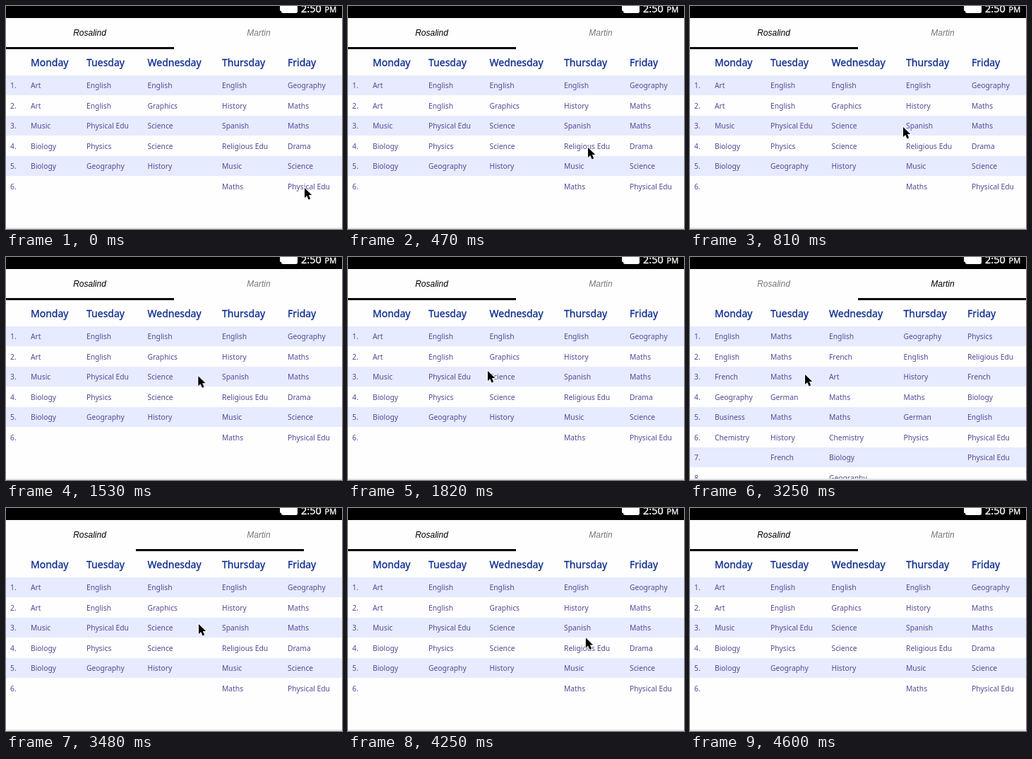
An HTML page that plays this animation: 476 by 315 pixels, repeating every 5450 ms.

```html
<!DOCTYPE html>
<html lang="en">
<head>
<meta charset="utf-8">
<title>Timetable</title>
<style>
html, body { margin: 0; width: 100%; height: 100%; overflow: hidden; background: #fefefe; }
svg { display: block; width: 476px; height: 315px; }
text { font-family: "Noto Sans", "Open Sans", sans-serif; white-space: pre; }
.cell { font-size: 10.3px; fill: #544a94; }
.head { font-size: 14px; fill: #0a2a8c; stroke: #0a2a8c; stroke-width: .3px; }
.tab { font: italic 12px "Liberation Sans", Arial, sans-serif; text-anchor: middle; }
.clock { fill: #fff; stroke: #fff; stroke-width: .3px; }

.first, .second, .tab, #bar, #arrow, #beam { animation: 5450ms step-end infinite; }
.first { animation-name: first; }
.second { animation-name: second; }
#tab1 { animation-name: tab1; }
#tab2 { animation-name: tab2; }
#bar { animation-name: bar; }
#arrow { animation-name: arrow; }
#beam { animation-name: beam; }

@keyframes first {
  0%, 62.789%, 100% { visibility: visible; }
  34.495% { visibility: hidden; }
}
@keyframes second {
  0%, 62.789%, 100% { visibility: hidden; }
  34.495% { visibility: visible; }
}
@keyframes tab1 {
  0%, 62.789%, 100% { fill: #000; }
  34.495% { fill: #777; }
}
@keyframes tab2 {
  0%, 62.789%, 100% { fill: #777; }
  34.495% { fill: #000; }
}
@keyframes beam {
  0%, 59.633%, 100% { visibility: hidden; }
  38.716% { visibility: visible; }
}
@keyframes bar {
  0%, 66.972%, 100% { transform: translateX(0); }
  34.495%, 62.789% { transform: translateX(229px); }
  34.495% { transform: translateX(9px); }
  35.541% { transform: translateX(55px); }
  36.606% { transform: translateX(143px); }
  37.651% { transform: translateX(218px); }
  38.716% { transform: translateX(238px); }
  63.853% { transform: translateX(184px); }
  64.899% { transform: translateX(95px); }
  65.963% { transform: translateX(20px); }
}
@keyframes arrow {
  0% { transform: translate(423px, 257px); }
  4.404% { transform: translate(423px, 257px); animation-timing-function: steps(5, start); }
  9.633% { transform: translate(340px, 200px); animation-timing-function: steps(6, start); }
  15.908% { transform: translate(302px, 171px); }
  26.972% { transform: translate(302px, 171px); animation-timing-function: steps(7, start); }
  34.465% { transform: translate(198px, 161px); animation-timing-function: steps(4, start); }
  38.71% { transform: translate(146px, 165px); }
  38.716% { transform: translate(-40px, 165px); }
  59.633% { transform: translate(135.5px, 166.5px); animation-timing-function: steps(5, start); }
  64.908% { transform: translate(273px, 164px); animation-timing-function: steps(3, start); }
  68.055% { transform: translate(318px, 161px); }
  77.982% { transform: translate(318px, 161px); animation-timing-function: steps(7, start); }
  85.468%, 100% { transform: translate(450px, 318px); }
}
</style>
</head>
<body>
<svg viewBox="0 0 476 315">
  <rect width="476" height="17"/>
  <rect x="390" y="-6" width="23" height="16" rx="2.5" fill="#fff"/>
  <rect x="388" y="-2" width="4" height="9" rx="1" fill="#fff"/>
  <text class="clock" x="418" y="9" font-size="14.5">2:50</text>
  <text class="clock" x="451.5" y="9" font-size="11">PM</text>

  <text class="tab" id="tab1" x="118.5" y="42">Rosalind</text>
  <text class="tab" id="tab2" x="358" y="42">Martin</text>
  <rect id="bar" y="58" width="238" height="3"/>

  <g id="tables"></g>
  <rect y="313" width="476" height="2" fill="#e4e4e4"/>

  <g id="beam" fill="none">
    <path id="ibeam" d="M137.5 159.5Q141 159.5 141 162V172Q141 174.5 137.5 174.5M144.5 159.5Q141 159.5 141 162M141 172Q141 174.5 144.5 174.5M139 168.5H143" stroke="#fff" stroke-width="2.4" stroke-opacity=".7"/>
    <use href="#ibeam"/>
    <path d="M137.5 159.5Q141 159.5 141 162V172Q141 174.5 137.5 174.5M144.5 159.5Q141 159.5 141 162M141 172Q141 174.5 144.5 174.5M139 168.5H143" stroke="#000" stroke-width="1.2"/>
  </g>
  <path id="arrow" d="M0 0V14L3.2 11L5.6 16.4L8.2 15.3L5.9 10.1H10.2Z" stroke="#fff" stroke-width="1.6" paint-order="stroke"/>
</svg>
<script>
const days = ["Monday", "Tuesday", "Wednesday", "Thursday", "Friday"];
const tables = [
  { name: "first", cols: [35, 114, 200.5, 306, 399], rows: [
    "Art,English,English,English,Geography",
    "Art,English,Graphics,History,Maths",
    "Music,Physical Edu,Science,Spanish,Maths",
    "Biology,Physics,Science,Religious Edu,Drama",
    "Biology,Geography,History,Music,Science",
    ",,,Maths,Physical Edu"] },
  { name: "second", cols: [35, 114, 197, 302.5, 393], rows: [
    "English,Maths,English,Geography,Physics",
    "English,Maths,French,English,Religious Edu",
    "French,Maths,Art,History,French",
    "Geography,German,Maths,Maths,Biology",
    "Business,Maths,Maths,German,English",
    "Chemistry,History,Chemistry,Physics,Physical Edu",
    ",French,Biology,,Physical Edu",
    ",,Geography,,"] }
];
const pitch = 28.5;

const label = (kind, x, y, s) => s ? `<text class="${kind}" x="${x}" y="${y}">${s}</text>` : "";

function draw({ name, cols, rows }) {
  let out = days.map((d, i) => label("head", cols[i], 85, d)).join("");
  rows.forEach((row, r) => {
    const top = 98 + r * pitch;
    if (r % 2 === 0) out += `<rect y="${top}" width="476" height="28" fill="#e6ebff"/>`;
    out += label("cell", 6, top + 18, `${r + 1}.`);
    row.split(",").forEach((s, i) => out += label("cell", cols[i], top + 18, s));
  });
  return `<g class="${name}">${out}</g>`;
}

document.getElementById("tables").innerHTML = tables.map(draw).join("");
</script>
</body>
</html>
```
